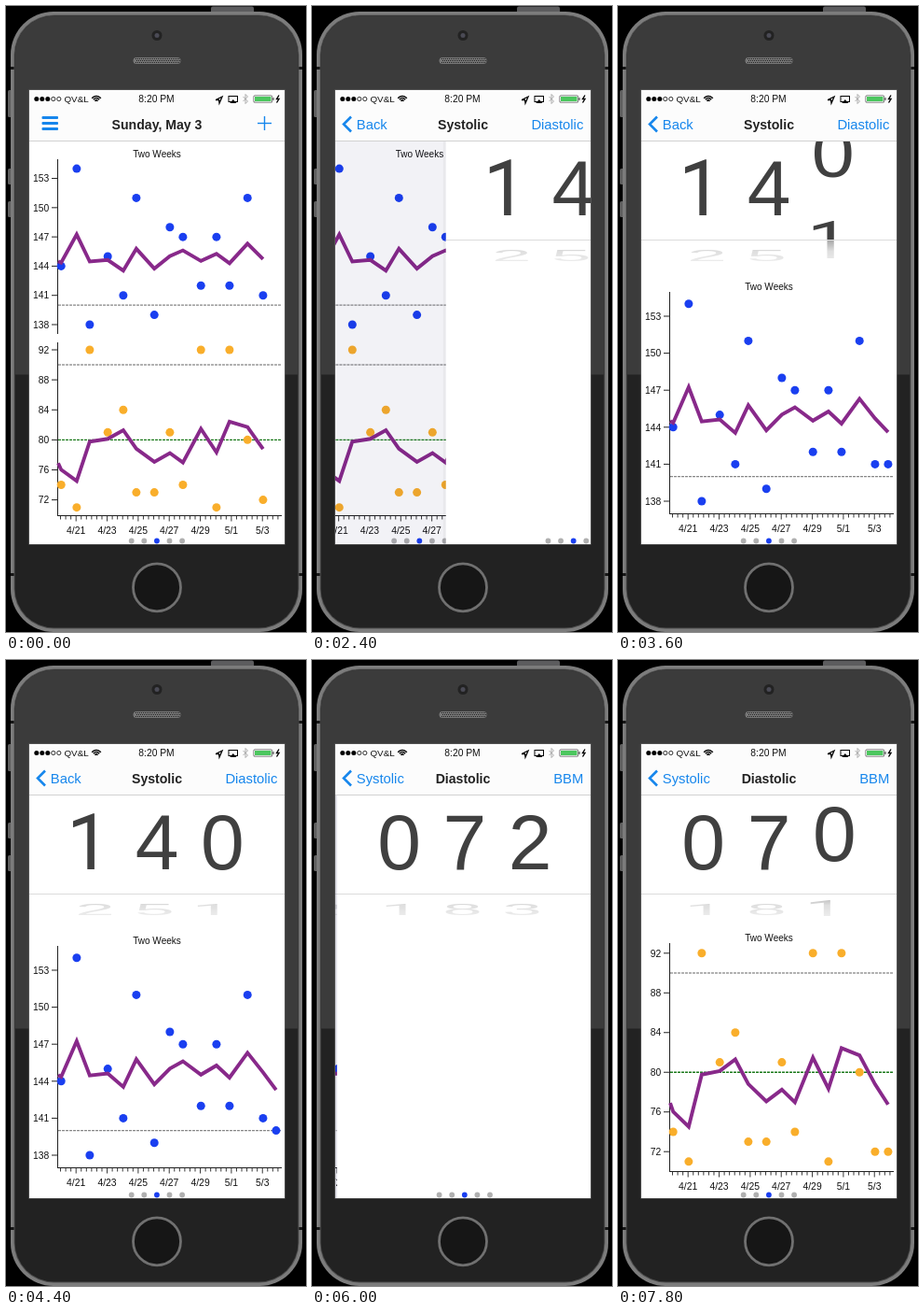
These frames come from a looping animation (322x670 px, 8 s). An HTML page with a canvas:

```html
<!DOCTYPE html>
<html lang="en">
<head>
<meta charset="utf-8">
<title>Blood pressure entry</title>
<style>
  html, body { margin: 0; width: 100%; height: 100%; overflow: hidden; background: #000; }
  canvas { display: block; }
</style>
</head>
<body>
<canvas id="stage" width="322" height="670"></canvas>
<script>
const ctx = document.getElementById('stage').getContext('2d');
const LOOP = 8000, STEP = 200;
const SANS = '"Liberation Sans", Arial, sans-serif';
const FOOTLESS = 'Roboto, "Liberation Sans", sans-serif';
const BLUE = '#1a3ff0', ORANGE = '#f9ae2b', PURPLE = '#88298a', LINK = '#1686ec';
const LEFT = 25, TOP = 90, WIDTH = 274, HEIGHT = 486, PAGE_TOP = 145, PAGE_HEIGHT = 431, CENTER = 162;
const DAY = 16.67;

const systolic = {
  color: BLUE, before: 144.5, low: 138, high: 153, gap: 3, limits: { 140: '#888' },
  values: [144, 154, 138, 145, 141, 151, 139, 148, 147, 142, 147, 142, 151, 141]
};
const diastolic = {
  color: ORANGE, before: 76.9, low: 72, high: 92, gap: 4, limits: { 90: '#999', 80: '#1c7a1c' },
  values: [74, 71, 92, 81, 84, 73, 73, 81, 74, 92, 71, 92, 80, 72]
};

const progress = (t, start, duration) => Math.min(1, Math.max(0, (t - start) / duration));
const easeOut = u => 1 - (1 - u) ** 2;
const dayX = day => 75.2 + day * DAY;
// One reading a day, every third one a few hours early
const readingX = i => dayX(i - 1 + (i % 3 === 2 ? -0.12 : 0.04));

function text(str, x, y, size, { color = '#111', align = 'center', font = SANS, weight = '' } = {}) {
  ctx.font = `${weight} ${size}px ${font}`;
  ctx.textAlign = align;
  ctx.fillStyle = color;
  ctx.fillText(str, x, y);
}
function stroke(color, width) {
  ctx.strokeStyle = color;
  ctx.lineWidth = width;
  ctx.stroke();
}
function line(points, color, width = 1, dash = []) {
  ctx.beginPath();
  points.forEach(([x, y]) => ctx.lineTo(x, y));
  ctx.setLineDash(dash);
  stroke(color, width);
  ctx.setLineDash([]);
}
function arc(x, y, r, from = 0, to = Math.PI * 2) {
  ctx.beginPath();
  ctx.arc(x, y, r, from, to);
}
function dot(x, y, r, color) {
  arc(x, y, r);
  ctx.fillStyle = color;
  ctx.fill();
}
function ring(x, y, r, color, width) {
  arc(x, y, r);
  stroke(color, width);
}
function rect(x, y, w, h, color, r = 0) {
  ctx.beginPath();
  ctx.roundRect(x, y, w, h, r);
  ctx.fillStyle = color;
  ctx.fill();
}
function triangle(x, y, w, h, color) {
  ctx.beginPath();
  ctx.moveTo(x, y);
  ctx.lineTo(x + w / 2, y + h);
  ctx.lineTo(x - w / 2, y + h);
  ctx.fillStyle = color;
  ctx.fill();
}
function clipped(x, y, w, h, draw) {
  ctx.save();
  ctx.beginPath();
  ctx.rect(x, y, w, h);
  ctx.clip();
  draw();
  ctx.restore();
}

function drawPhone() {
  const metal = '#7c7c7c';
  const body = color => rect(9.5, 10.5, 304, 655, color, 42);
  rect(0, 0, 322, 670, '#000');
  rect(220, 0.5, 46, 8, '#5c5c5e', 2);
  rect(2, 90, 6, 29, '#606060', 1.5);
  for (const y of [174, 209]) rect(2, y, 6, 17, '#606060', 1.5);
  rect(5, 6, 313, 664, metal, 46);
  for (const y of [65, 607]) rect(5, y, 313, 3, '#161616');
  rect(8.5, 9.5, 306, 657, '#505050', 43);
  body('#222');
  clipped(0, 0, 322, 394.5, () => body('#3b3b3b'));
  rect(24.4, 89.4, 275.2, 487.2, '#6a6a6a');

  dot(CENTER, 31.5, 5.5, '#222');
  dot(CENTER, 31.5, 2.5, '#4a4a55');
  rect(136.5, 55, 51, 7, '#777', 3.5);
  for (let row = 0; row < 3; row++)
    for (let x = 139; x < 186; x += 2) rect(x + row % 2, 56 + row * 2, 1, 1, '#222');

  dot(CENTER, 622.3, 27, '#161616');
  ring(CENTER, 622.3, 25.5, '#707070', 2.8);
}

function drawStatusBar() {
  for (let i = 0; i < 5; i++)
    i < 3 ? dot(32.8 + i * 6, 99.5, 2.5, '#000') : ring(32.8 + i * 6, 99.5, 2.1, '#000', 0.8);
  text('QV&L', 62.5, 103, 9.8, { align: 'left' });
  for (let r = 2; r < 7; r += 2.2) {
    arc(97, 103, r, -Math.PI * 0.77, -Math.PI * 0.23);
    stroke('#000', 1.5);
  }
  text('8:20 PM', 161.5, 103, 10.3);
  line([[225, 100.5], [232, 97], [229, 104], [228.5, 100.5], [225, 100.5]], '#000', 1.3);
  ctx.strokeStyle = '#000';
  ctx.lineWidth = 1;
  ctx.strokeRect(239, 96.5, 9.5, 6);
  triangle(243.8, 100, 7, 4, '#000');
  line([[254.5, 97], [259.5, 102], [257, 104.5], [257, 94.5], [259.5, 97], [254.5, 102]], '#999', 0.8);
  rect(265.5, 95.5, 20.5, 8, '#555', 1.5);
  rect(266.2, 96.2, 19.1, 6.6, '#fff', 1);
  rect(267, 97, 17.5, 5, '#4cc75f');
  rect(286.3, 98, 1.3, 3, '#555');
  line([[293, 95.5], [290.5, 99.5], [293, 99.5], [290.5, 103.5]], '#000', 1.4);
}

function drawNavBar({ title, back, next }) {
  rect(LEFT, TOP, WIDTH, 55, '#fcfcfc');
  rect(LEFT, 144, WIDTH, 1, '#d2d2d2');
  drawStatusBar();
  text(title, CENTER, 131.5, 14.1, { weight: 'bold', color: '#222' });
  if (back) {
    line([[42, 118.5], [34, 126.5], [42, 134.5]], LINK, 2.6);
    text(back, 47.8, 132, 14.8, { color: LINK, align: 'left' });
    text(next, 291.3, 132, 14.8, { color: LINK, align: 'right' });
  } else {
    for (let i = 0; i < 3; i++) rect(38.5, 118 + i * 6, 17.5, 3, LINK, 1);
    line([[270, 125.5], [285, 125.5]], LINK, 1.4);
    line([[277.5, 118], [277.5, 133]], LINK, 1.4);
  }
}

// lowY is the height of the lowest tick, unit the pixels per mmHg
function drawPlot(series, { lowY, unit, top, bottom, latest = [] }) {
  const toY = v => lowY - (v - series.low) * unit;
  line([[55.5, top], [55.5, bottom]], '#222');
  for (let v = series.low; v <= series.high; v += series.gap) {
    line([[49, toY(v)], [55, toY(v)]], '#222');
    text(v, 46.3, toY(v) + 3.7, 10.3, { align: 'right' });
  }
  for (const [v, color] of Object.entries(series.limits))
    line([[56, toY(v)], [296, toY(v)]], color, 1.4, [3, 1]);

  // The trend is an exponential moving average of the readings
  let average = series.before;
  const trend = [[56, toY(average)]];
  [...series.values, ...latest].forEach((v, i) => {
    average += 0.3 * (v - average);
    trend.push([readingX(i), toY(average)]);
    dot(readingX(i), toY(v), 4.5, series.color);
  });
  line(trend, PURPLE, 3.9);
}

function drawDateAxis(y) {
  line([[55, y], [296, y]], '#222');
  for (let i = -3; i <= 39; i++)
    line([[dayX(i / 3), y], [dayX(i / 3), y + (i % 6 ? 4 : 6)]], '#222', 0.9);
  for (let day = 0; day <= 12; day += 2) {
    const date = day < 10 ? `4/${21 + day}` : `5/${day - 9}`;
    text(date, dayX(day), y + 19, 10.4);
  }
}

function drawPager() {
  for (let i = 0; i < 5; i++) dot(134.7 + i * 13.6, 572.5, 2.9, i === 2 ? BLUE : '#b0b0b0');
}

function drawOverview() {
  text('Two Weeks', CENTER, 161.5, 10);
  drawPlot(systolic, { lowY: 341, unit: 10.43, top: 164, bottom: 351 });
  drawPlot(diastolic, { lowY: 528.6, unit: 8.03, top: 360, bottom: 545 });
  drawDateAxis(545.5);
  drawPager();
}

// Each wheel is a drum whose digits are flat panels, 79 degrees apart
function drawWheel(position, offset) {
  const pitch = 79 * Math.PI / 180;
  const first = Math.floor(position);
  for (let n = first; n <= first + 2; n++) {
    const angle = (n - position) * pitch, squash = Math.cos(angle), tilt = 1 - squash;
    if (squash < 0.02) continue;
    const isOne = n % 10 === 1;
    ctx.save();
    ctx.translate(CENTER - 3 * tilt, 195 + 74 * Math.sin(angle));
    ctx.scale(1 - 0.11 * tilt, squash);
    text(n % 10, offset - (isOne ? 3 : 0), 28.6, 84, { color: '#404040', font: isOne ? FOOTLESS : SANS });
    ctx.restore();
  }
}

function drawDials(positions) {
  clipped(LEFT, PAGE_TOP, WIDTH, 129, () => {
    positions.forEach((position, i) => drawWheel(position, (i - 1) * 70.3));
    const haze = ctx.createLinearGradient(0, 251, 0, 274);
    haze.addColorStop(0, 'rgba(255,255,255,.55)');
    haze.addColorStop(0.5, 'rgba(255,255,255,.83)');
    haze.addColorStop(1, 'rgba(255,255,255,.9)');
    rect(LEFT, 251, WIDTH, 23, haze);
  });
  rect(LEFT, 250, WIDTH, 1, '#dcdcdc');
}

function drawSystolic(t, settled) {
  const roll = progress(t, 3200, 640);
  drawDials([1, 4, 1 - roll]);
  if (settled) {
    text('Two Weeks', CENTER, 303.5, 10);
    drawPlot(systolic, { lowY: 530, unit: 13.2, top: 306, bottom: 543, latest: [roll < 1 ? 141 : 140] });
    drawDateAxis(543.5);
  }
  drawPager();
}

function drawDiastolic(t, settled) {
  drawDials([0, 7, 2 - 2 * progress(t, 6570, 1280)]);
  if (settled) {
    text('Two Weeks', CENTER, 300.5, 10);
    drawPlot(diastolic, { lowY: 526.2, unit: 10.62, top: 303, bottom: 547, latest: [72] });
    drawDateAxis(547.5);
  }
  drawPager();
}

const pages = [
  { draw: drawOverview, title: 'Sunday, May 3', pushAt: -LOOP },
  { draw: drawSystolic, title: 'Systolic', back: 'Back', next: 'Diastolic', pushAt: 2195 },
  { draw: drawDiastolic, title: 'Diastolic', back: 'Systolic', next: 'BBM', pushAt: 5450 }
];

function drawScreen(t) {
  let nav;
  pages.forEach((page, i) => {
    const p = easeOut(progress(t, page.pushAt, 600));
    const following = pages[i + 1];
    const covered = following ? easeOut(progress(t, following.pushAt, 600)) : 0;
    if (p === 0 || covered === 1) return;
    ctx.save();
    ctx.translate((1 - p - 0.3 * covered) * WIDTH, 0);
    if (p < 1) rect(LEFT - 3, PAGE_TOP, 3, PAGE_HEIGHT, 'rgba(0,0,0,.04)');
    rect(LEFT, PAGE_TOP, WIDTH, PAGE_HEIGHT, '#fff');
    page.draw(t, p === 1);
    rect(LEFT, PAGE_TOP, WIDTH, PAGE_HEIGHT, `rgba(0,0,90,${0.09 * covered})`);
    ctx.restore();
    if (!nav || p > 0.4) nav = page;
  });
  drawNavBar(nav);
}

function frame(now) {
  const t = Math.floor(now % LOOP / STEP) * STEP;
  drawPhone();
  clipped(LEFT, TOP, WIDTH, HEIGHT, () => drawScreen(t));
  requestAnimationFrame(frame);
}
frame(0);
</script>
</body>
</html>
```
